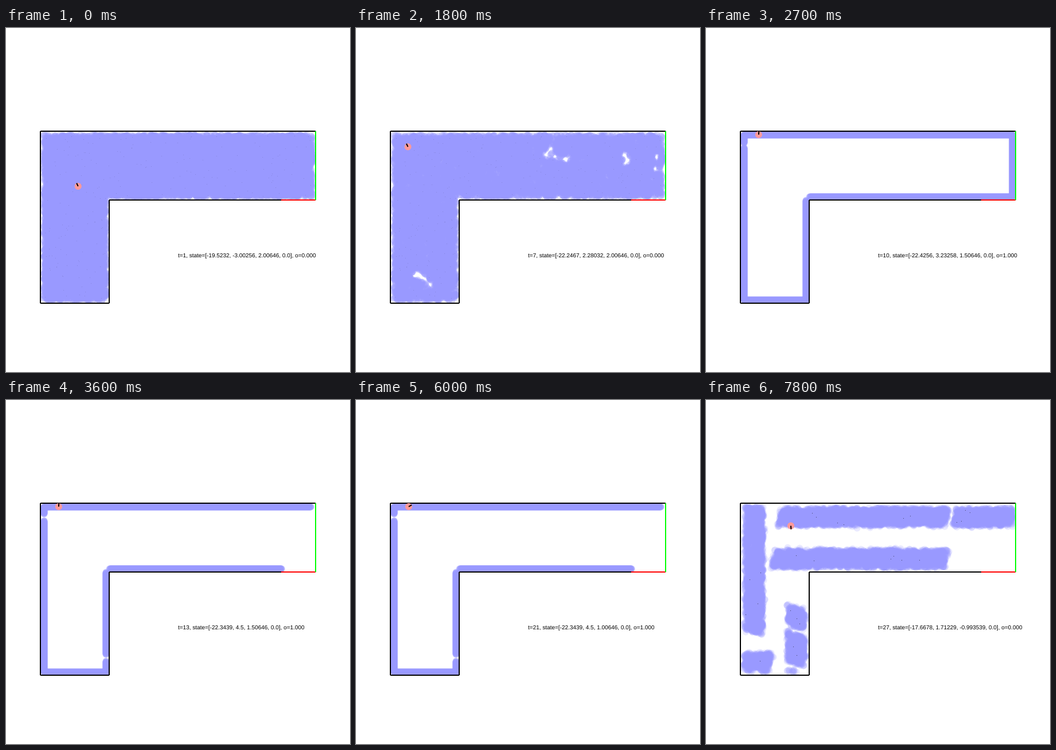
A matplotlib script that plays this animation: 600 by 600 pixels, repeating every 8 s.

```python
import math

import numpy as np
import matplotlib.pyplot as plt
from matplotlib.animation import FuncAnimation

SIZE, DPI = 600, 100
PX = 72 / DPI
RADIUS = 6
UNIT = 12
BLUE, ROSE = (0.6, 0.6, 1.0), (1.0, 0.6, 0.6)
LAST = 27
BUMP, DROP, LAUNCH = 10, 11, 25

plt.rcParams["font.family"] = "Liberation Sans"
plt.rcParams["text.hinting"] = "none"
rng = np.random.default_rng(7)

# Clockwise outline of the room
CORNERS = [(60, 180), (540, 180), (540, 300), (180, 300), (180, 480), (60, 480)]
EDGES = list(zip(CORNERS, CORNERS[1:] + CORNERS[:1]))


def simulate():
    """Poses before the first step and after each step."""
    x, y, start = -19.52317, -3.002564, 2.00646068
    poses = [(x, y, start)]
    for t in range(1, LAST + 1):
        turns = np.interp(t, [2, 3, 4, 7, 8, 15, 18, 20, 22, 24, 27],
                          [0, 1, 0, 0, -1, -1, -4, -2, -4, -4, -7])
        heading = start + 0.5 * float(turns)
        dist = 5 if t in (2, BUMP, LAUNCH) else .5 if t in (3, 4, 7, 8, 26) else 0
        if y + dist * math.sin(heading) > 4.5:
            dist = (4.5 - y) / math.sin(heading)
        x += dist * math.cos(heading)
        y += dist * math.sin(heading)
        poses.append((x, y, heading))
    return poses


def inside(p):
    x, y = p.T
    hall = (x >= 66) & (x <= 534) & (y >= 186) & (y <= 294)
    leg = (x >= 66) & (x <= 174) & (y >= 186) & (y <= 474)
    return hall | leg


def clear_of(p, centers, radius):
    gaps = p[:, None] - np.array(centers)
    return (np.hypot(gaps[..., 0], gaps[..., 1]) > radius).all(axis=1)


pool = rng.uniform((66, 186), (534, 474), (40000, 2))
pool = pool[inside(pool)]
holes = np.vstack([rng.normal(center, (16, 11), (5, 2))
                   for center in ((488, 238), (350, 222), (115, 437))])


def cloud(t):
    """Particles all over the room, thinning out with each step."""
    p = pool[:14000 - 600 * (t - 1)]
    return p if t == 1 else p[clear_of(p, holes, 5 + t / 3)]


def wall_points(edge, spacing):
    """Particles touching a wall, with its direction and inward normal."""
    a, b = np.array(edge, float)
    length = np.hypot(*(b - a))
    d = (b - a) / length
    n = np.array([-d[1], d[0]])
    p = a + np.outer(np.arange(0, length + .1, spacing), d) + RADIUS * n
    return p[inside(p)], d, n


def survivors(p):
    """Drop the particles that reached the green or red wall."""
    x, y = p.T
    return p[(x <= 531) & ((x <= 480) | (y < 190))]


def touching(t):
    p = np.vstack([wall_points(edge, .5)[0] for edge in EDGES])
    if t < DROP:
        return p[clear_of(p, [(66, 204)], 3.5)]
    p = survivors(p)
    return p[clear_of(p, [(66, 204), (174, 449)], 5.5)]


def launch():
    """Leave the walls: each particle keeps its own angle to its wall."""
    lost = [(364, 186), (174, 339), (174, 404), (66, 474)]
    first, second = [], []
    for edge in EDGES:
        p, d, n = wall_points(edge, .33)
        p = survivors(p)
        p = p[clear_of(p, lost, 7)]
        angle = rng.uniform(0, .47, len(p))

        def step(dist, a):
            return dist * (np.outer(np.cos(a), d) + np.outer(np.sin(a), n))

        p = p + step(5 * UNIT, angle)
        first.append(p)
        second.append(p + step(.5 * UNIT, angle + .5))
    first, second = np.vstack(first), np.vstack(second)
    keep = inside(first)
    return first[keep], second[keep]


def scattered(p, spread):
    p = np.repeat(p, 4, axis=0)
    p = p + rng.normal(0, spread, p.shape)
    return p[inside(p)]


def build():
    launched, moved = launch()
    steps = {}
    for t in range(1, LAST + 1):
        if t < BUMP:
            steps[t] = cloud(t), .35
        elif t < LAUNCH:
            steps[t] = touching(t), .35
        elif t == LAUNCH:
            steps[t] = launched, .38
        else:
            steps[t] = scattered(moved, 1.6), .2
    return steps


poses = simulate()
beliefs = build()
specks = {t: (pool[-200:], .15) for t in range(1, BUMP)}
specks[LAST] = rng.permutation(beliefs[LAST][0])[:26], .75

fig = plt.figure(figsize=(SIZE / DPI, SIZE / DPI), dpi=DPI, facecolor="white")
ax = fig.add_axes([0, 0, 1, 1])
ax.set(xlim=(0, SIZE), ylim=(SIZE, 0))
ax.axis("off")


def dots(diameter, color, z):
    return ax.plot([], [], "o", ms=diameter * PX, mew=0, color=color,
                   zorder=z)[0]


def line(x, y, color, z):
    return ax.plot(x, y, color=color, lw=2 * PX, solid_capstyle="butt",
                   zorder=z)[0]


particles = dots(2 * RADIUS, BLUE, 1)
marks = dots(1, "black", 2)
for edge in EDGES:
    line(*zip(*edge), "black", 3)
line((480, 540), (300, 300), (1, 0, 0), 3)
line((540, 540), (180, 300), (0, 1, 0), 3)
body = plt.Circle((0, 0), RADIUS, fc=ROSE, ec="none", zorder=4)
ax.add_patch(body)
nose = line([], [], "black", 5)
label = ax.text(300, 400, "", fontsize=10 * PX, va="baseline", zorder=6)


def draw(frame):
    t = min(frame // 3 + 1, LAST)
    points, alpha = beliefs[t]
    particles.set_data(points[:, 0], points[:, 1])
    particles.set_alpha(alpha)
    points, alpha = specks.get(t, (np.empty((0, 2)), 1))
    marks.set_data(points[:, 0], points[:, 1])
    marks.set_alpha(alpha)

    x, y, heading = poses[t]
    cx, cy = 300 + UNIT * (x + 5), 300 - UNIT * (y + 5)
    body.center = cx, cy
    nose.set_data([cx, cx + RADIUS * math.cos(heading)],
                  [cy, cy - RADIUS * math.sin(heading)])

    state = ", ".join(f"{v:.6g}" for v in poses[t - 1])
    bump = float(BUMP <= t < LAUNCH)
    label.set_text(f"t={t}, state=[{state}, 0.0], o={bump:.3f}")
    return particles, marks, body, nose, label


anim = FuncAnimation(fig, draw, frames=80, interval=100, repeat=True,
                     repeat_delay=0, blit=False)
plt.show()
```
